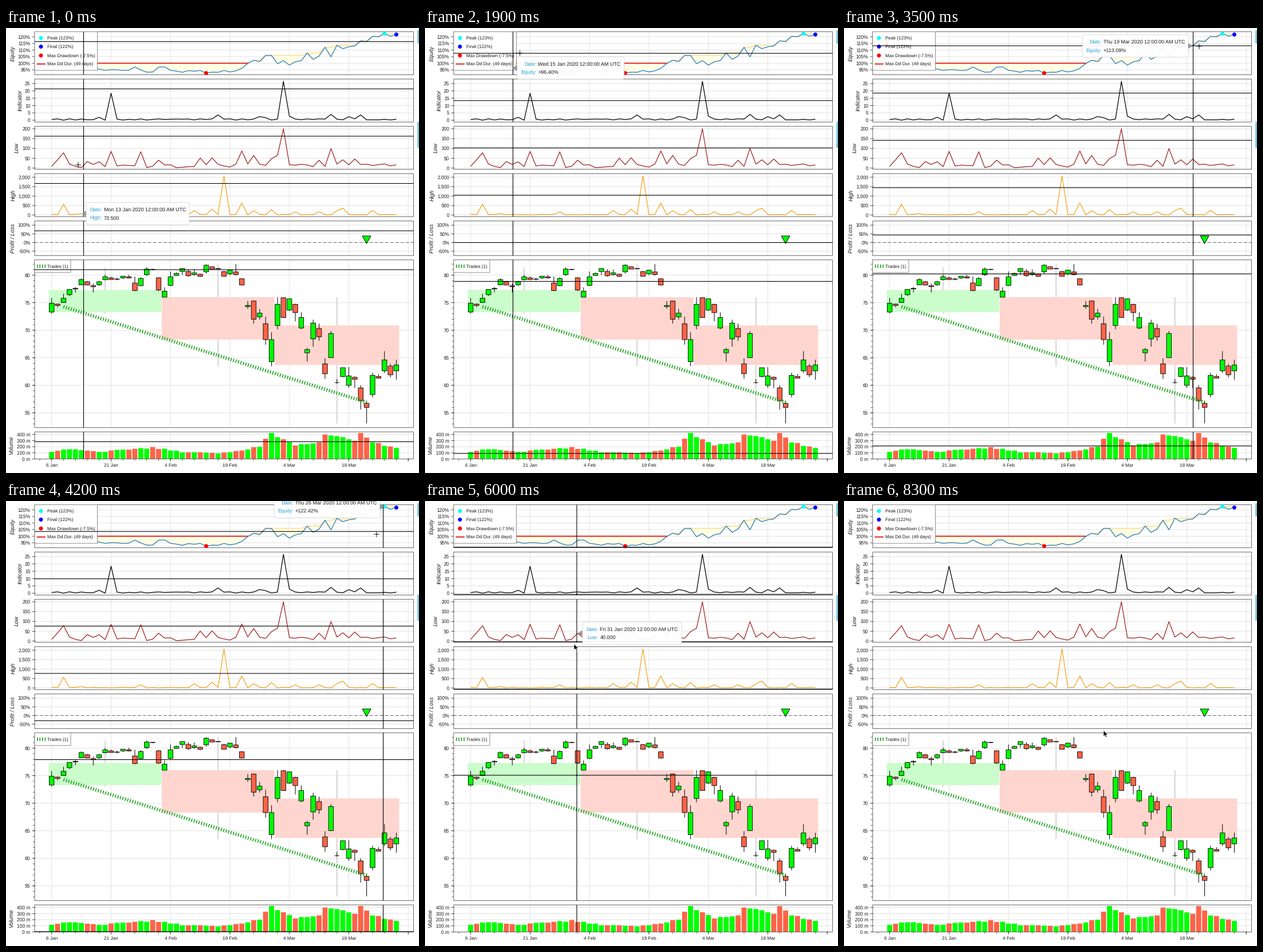
A matplotlib script that plays this animation: 721 by 777 pixels, repeating every 8.4 s.

```python
import numpy as np
import matplotlib
import matplotlib.pyplot as plt
from matplotlib.animation import FuncAnimation
from matplotlib.collections import LineCollection, PatchCollection
from matplotlib.patches import Circle, FancyBboxPatch, Polygon, Rectangle

matplotlib.rcParams.update({"font.family": "Liberation Sans", "text.hinting": "none",
                            "path.snap": False})

W, H = 721, 777
FRAMES, STEP = 84, 100
LEFT, RIGHT = 50, 711.5
X0, DX, N = 79.7, 10.375, 59
LIME, TOMATO, GREEN, INK = "#00ff00", "#ff6347", "#0a9e0a", "#1a1a1a"
LAG = 0.04  # the crosshair trails the pointer, in seconds

# name, top, bottom, label x, y of zero, pixels per unit, ticks, tick format
PANELS = [
    ("Equity", 6.5, 81.6, 12, 291.5, 2.3, range(95, 121, 5), "{:.0f}%"),
    ("Indicator", 89.1, 164.2, 25, 161, 2.56, range(0, 26, 5), "{:.0f}"),
    ("Low", 171.7, 246.8, 19, 244.5, 0.3425, range(0, 201, 50), "{:.0f}"),
    ("High", 254.3, 329.4, 13, 326.5, 0.033, range(0, 2001, 500), "{:,.0f}"),
    ("Profit / Loss", 336.9, 397.4, 12, 374.5, 0.303, range(-50, 101, 50), "{:.0f}%"),
    ("", 404.8, 697.7, 0, 1201.1, 9.62, range(55, 81, 5), "{:.0f}"),
    ("Volume", 705.2, 752.5, 9, 752.5, 0.107, range(0, 401, 100), "{:.0f} m"),
]

rng = np.random.default_rng(4)
idx = np.arange(N)
xs = X0 + DX * idx
days = np.busday_offset("2020-01-06", idx, roll="forward",
                        holidays=["2020-01-20", "2020-02-17"])

# Closing prices drive the candles, the equity curve and the monthly blocks.
close = np.array([
    74.9, 74.5, 75.8, 77.4, 77.6, 79.2, 78.2, 77.9, 78.8, 79.7, 79.2, 79.3, 79.8, 79.5,
    77.2, 79.4, 81.1, 81, 77.3, 77.1, 79.7, 80.3, 81.2, 79.9, 80.4, 79.8, 81.8, 81.1,
    81.2, 79.8, 80.9, 80.1, 78.2, 74.5, 72, 73.1, 68.3, 68.3, 74.7, 72.3, 75.7, 73.2,
    72.3, 66.5, 71.3, 68.8, 62.1, 69.4, 60.5, 63.2, 61.7, 61.1, 57.2, 56, 61.8, 61.3,
    64.6, 61.9, 63.7])
GAPS = {0: 73.3, 19: 76, 33: 74.3, 34: 75.3, 37: 64.3, 39: 75.9, 42: 70.4, 43: 65.9,
        46: 63.9, 48: 60.5, 50: 60}
previous = np.r_[close[0], close[:-1]]
opening = previous + 0.4 * (close - previous)
opening[list(GAPS)] = list(GAPS.values())
reach = np.where(idx < 32, 0.25, 0.7)
high = np.maximum(opening, close) + np.minimum(rng.exponential(reach), 1.6)
low = np.minimum(opening, close) - np.minimum(rng.exponential(reach), 1.6)
high = np.minimum(high, np.where(idx < 33, 82, 76))
low[53] = 53.1
colors = [LIME if up else TOMATO for up in close >= opening]

volume = np.interp(idx, [0, 3, 8, 17, 22, 28, 32, 35, 37, 41, 45, 46, 50, 51, 52, 54, 58],
                   [120, 165, 118, 190, 115, 95, 135, 215, 420, 220, 280, 415, 320, 290,
                    405, 290, 172]) * rng.uniform(0.92, 1.05, N)

# A short from bar 2, turned into a long at bar 53.
ENTRY, EXIT, BUY, SELL = 74.273, 56.9, 53, 2
equity = 100 + 0.99368 * (ENTRY - close)
equity[:SELL] = 100
equity[BUY:] = 116.4 + 0.7 * (close[BUY:] - close[BUY])


def spiky(lo, hi, peaks):
    v = np.round(2 * rng.uniform(lo, hi, N)) / 2 if hi > 2 else rng.uniform(lo, hi, N)
    v[list(peaks)] = list(peaks.values())
    return v


SERIES = {
    "Equity": equity,
    "Indicator": spiky(0, 1, {8: 2, 10: 18.4, 28: 3.6, 35: 2.5, 36: 1.7, 39: 26.5,
                              40: 2.8, 47: 4, 50: 2.4, 52: 3.6}),
    "Low": spiky(2, 22, {1: 42, 2: 78, 6: 33, 8: 32, 10: 85, 15: 83, 18: 40, 25: 51,
                         27: 52, 28: 18.5, 32: 87, 34: 64, 37: 48, 38: 65, 39: 200,
                         45: 40, 47: 99, 49: 42, 51: 46}),
    "High": spiky(3, 40, {2: 570, 5: 73.5, 8: 15.5, 15: 170, 24: 230, 27: 310, 29: 2070,
                          32: 640, 34: 230, 37: 290, 41: 165, 45: 170, 48: 230, 49: 365,
                          54: 245}),
}
COLORS = {"Equity": "#1f77b4", "Indicator": "black", "Low": "#a02020", "High": "#f5a21b"}

# pointer path: seconds, x, y
PATH = np.array([
    (-0.04, 135.5, 271.5), (0, 126, 239), (0.9, 134, 68), (1.2, 80, 52), (1.4, 14, 48),
    (2.66, 396.2, 37.5), (2.7, 406, 38), (3.46, 609.5, 31), (3.5, 620, 32),
    (3.8, 668, 34), (4.1, 676, 46), (5.16, 367, 173.8), (5.2, 359, 174.2),
    (6.76, 166, 321), (6.8, 163, 321), (7.4, 230, 316), (7.8, 362, 314),
    (8.16, 453, 400.5)])

fig = plt.figure(figsize=(W / 72, H / 72), dpi=72, facecolor="white")
ax = fig.add_axes([0, 0, 1, 1])
ax.set(xlim=(0, W), ylim=(H, 0))
ax.axis("off")


def line(px, py, color, lw=1, z=3, **kw):
    kw.setdefault("solid_capstyle", "butt")
    return ax.plot(px, py, color=color, lw=lw, zorder=z, **kw)[0]


def label(x, y, s, size, ha="left", color=INK, z=6):
    return ax.text(x, y + 0.36 * size, s, size=size, ha=ha, va="baseline",
                   color=color, zorder=z)


def box(x0, y0, x1, y1, face, edge="none", z=2, **kw):
    ax.add_patch(Rectangle((x0, y0), x1 - x0, y1 - y0, fc=face, ec=edge, lw=1,
                           zorder=z, **kw))


def dot(x, y, color, z=5):
    ax.add_patch(Circle((x, y), 3.5, fc=color, ec="none", zorder=z))


def segments(segs, color, lw, z):
    ax.add_collection(LineCollection(segs, colors=color, linewidths=lw, zorder=z))


def bars(half, top, bottom, edge, z):
    rects = [Rectangle((x - half, a), 2 * half, b - a) for x, a, b in zip(xs, top, bottom)]
    ax.add_collection(PatchCollection(rects, facecolors=colors, edgecolors=edge,
                                      linewidths=0.9, zorder=z))


def hatched(px, py, z):
    line(px, py, GREEN, 6, z, linestyle=(0, (0.25, 0.5)), dash_capstyle="butt")


def to_y(panel, v):
    return panel[4] - panel[5] * v


def draw_panels():
    ticks_x = X0 + DX * np.arange(0, 61, 10)
    grid, marks = [], []
    for panel in PANELS:
        name, top, bottom, lx, *_, ticks, fmt = panel
        grid += [[(x, top), (x, bottom)] for x in ticks_x]
        for v in ticks:
            y = to_y(panel, v)
            grid.append([(LEFT, y), (RIGHT, y)])
            marks.append([(45.5, y), (51.5, y)])
            label(42.5, y, fmt.format(v), 8.5, "right")
        ax.text(lx, (top + bottom) / 2, name, size=9.75, style="italic", rotation=90,
                ha="center", va="center", color=INK)
        box(LEFT, top, RIGHT, bottom, "none", "#666666", 5)
    minor = [to_y(PANELS[5], v) for v in range(53, 83)]
    marks += [[(47, y), (50, y)] for y in minor]
    marks += [[(x, 751), (x, 757)] for x in ticks_x]
    marks += [[(x, 752.5), (x, 755.5)] for x in X0 + 2 * DX * np.arange(-1, 31)]
    segments(grid, "#e3e3e3", 1, 1)
    segments(marks, "#333333", 0.8, 5)
    for x, s in zip(ticks_x, ["6 Jan", "21 Jan", "4 Feb", "19 Feb", "4 Mar", "18 Mar"]):
        label(x, 763, s, 8.3, "center")


def draw_series():
    for panel in PANELS[:4]:
        line(xs, to_y(panel, SERIES[panel[0]]), COLORS[panel[0]], 1.25, 4,
             solid_joinstyle="round")
    y = to_y(PANELS[0], equity)
    best = np.minimum.accumulate(y)
    ax.fill_between(xs, y, best, fc="#ffffe4", ec="none", zorder=2)
    line(xs, best, "#ffcb66", 1, 3)
    line([X0, xs[33]], [61.5, 61.5], "#e01010", 1.8, 4)
    for i, c in [(equity.argmin(), "red"), (equity.argmax(), "cyan"), (N - 1, "blue")]:
        dot(xs[i], y[i], c)


def draw_price():
    price = PANELS[5]
    for a, b in [(0, 18), (19, 37), (38, 58)]:
        mid = (xs[a] + xs[b]) / 2
        wick = [to_y(price, low[a:b + 1].min()), to_y(price, high[a:b + 1].max())]
        line([mid, mid], wick, "#bdbdbd", 1.2, 2)
        box(xs[a] - 4.9, to_y(price, opening[a]), xs[b] + 4.9, to_y(price, close[b]),
            "#cbfccb" if close[b] > opening[a] else "#ffd5cf")
    segments([[(x, to_y(price, a)), (x, to_y(price, b))] for x, a, b in zip(xs, low, high)],
             "black", 1, 3)
    bars(4.2, to_y(price, np.maximum(opening, close)),
         to_y(price, np.minimum(opening, close)), "black", 4)
    bars(4.4, to_y(PANELS[6], volume), np.full(N, PANELS[6][4]), "none", 3)
    hatched([xs[SELL], xs[BUY]], [to_y(price, ENTRY), to_y(price, EXIT)], 4.5)


def draw_profit():
    line([LEFT, RIGHT], [374.5, 374.5], "#555555", 0.9, 3, linestyle=(0, (6, 4)))
    ax.add_patch(Polygon([(622, 363), (637, 363), (629.5, 376.5)], fc=LIME, ec="black",
                         lw=0.9, zorder=4))


def draw_legends():
    box(LEFT, 6.5, 159.5, 74, "white", "#8a8a8a", 5.5, alpha=0.97)
    for y, c, s in [(17.5, "cyan", "Peak (123%)"), (32.5, "blue", "Final (122%)"),
                    (48, "red", "Max Drawdown (-7.5%)")]:
        dot(61, y, c, 6)
        label(72, y, s, 8)
    line([53.5, 69], [62.8, 62.8], "#e01010", 1.8, 6)
    label(72, 62.8, "Max Dd Dur. (49 days)", 8)
    box(LEFT, 404.8, 113, 427, "white", "#8a8a8a", 5.5, alpha=0.97)
    hatched([54, 70], [416, 416], 6)
    label(72, 416, "Trades (1)", 8)


draw_panels()
draw_series()
draw_price()
draw_profit()
draw_legends()
for y0, y1 in [(4, 27), (164, 209)]:
    box(718.5, y0, 720.5, y1, "#45b5d3")

hair = line([], [], "black", 1.1, 7)
tip = ax.add_patch(FancyBboxPatch((0, 0), 1, 1, boxstyle="round,pad=0,rounding_size=2.5",
                                  fc="white", ec="#d5d5d5", lw=0.9, alpha=0.95, zorder=8))
notch = ax.add_patch(Polygon([(0, 0)] * 3, fc="#909599", ec="none", zorder=8))
keys = [label(0, 0, "", 9, "right", "#2a9fd0", 9) for _ in range(2)]
vals = [label(0, 0, "", 9, "left", INK, 9) for _ in range(2)]
TIP = [tip, notch, *keys, *vals]

PLUS = np.array([(-5, 0), (5, 0), (np.nan, 0), (0, -5), (0, 5)])
ARROW = np.array([(0, 0), (0, 10.5), (2.4, 8.4), (4, 12), (5.8, 11.2), (4.3, 7.7), (7.4, 7.4)])
HAND = np.array([(-1, 0), (0.8, 0), (1.2, 4), (5, 4.8), (6.6, 6), (6.2, 9), (5, 11.2),
                 (0, 11.2), (-3.8, 6.6), (-3, 5.6), (-1.2, 7)])
plus = line([], [], "#222222", 1, 10)
arrow = ax.add_patch(Polygon(ARROW, fc="black", ec="white", lw=0.7, zorder=10))
hand = ax.add_patch(Polygon(HAND, fc="white", ec="black", lw=0.9, zorder=10))


def pointer(t):
    return [np.interp(t, PATH[:, 0], PATH[:, c]) for c in (1, 2)]


def panel_at(x, y):
    if LEFT <= x <= RIGHT:
        for p in PANELS:
            if p[1] <= y <= p[2]:
                return p
    return None


def width(text):
    return text.get_window_extent().width


def show_tip(panel, x):
    name = panel[0]
    i = int(np.clip(round((x - X0) / DX), 0, N - 1))
    v = SERIES[name][i]
    px, py = xs[i], to_y(panel, v)
    keys[0].set_text("Date:")
    keys[1].set_text(name + ":")
    vals[0].set_text(days[i].item().strftime("%a %d %b %Y") + " 12:00:00 AM UTC")
    vals[1].set_text(f"{v - 100 if v < 0 else v:+.2f}%" if name == "Equity" else f"{v:.3f}")
    key_w = max(map(width, keys))
    w = key_w + max(map(width, vals)) + 15
    side = 1 if px < W / 2 else -1
    x0 = px + 8.5 if side > 0 else px - 7.5 - w
    tip.set_bounds(x0, py - 19.5, w, 39)
    notch.set_xy([(px + side, py), (px + 8 * side, py - 5), (px + 8 * side, py + 5)])
    for row in range(2):
        y = py - 4.1 + 14.6 * row
        keys[row].set_position((x0 + 6 + key_w, y))
        vals[row].set_position((x0 + 9 + key_w, y))


def update(k):
    t = k * STEP / 1000
    (hx, hy), (cx, cy) = pointer(t - LAG), pointer(t)
    in_legend = LEFT <= cx <= 159.5 and 6.5 <= cy <= 74
    panel = None if in_legend else panel_at(hx, hy)

    pts = []
    if panel:
        off = hy - panel[1]
        for _, top, bottom, *_ in PANELS:
            pts += [(hx, top), (hx, bottom), (np.nan, 0)]
            if top + off <= bottom:
                pts += [(LEFT, top + off), (RIGHT, top + off), (np.nan, 0)]
    hair.set_data(*np.array(pts).T if pts else ([], []))

    tipped = bool(panel) and panel[0] in SERIES
    for a in TIP:
        a.set_visible(tipped)
    if tipped:  # text must be visible to be measured
        show_tip(panel, hx)

    crossed = not in_legend and panel_at(cx, cy) is not None
    hand.set_visible(in_legend)
    plus.set_visible(crossed)
    arrow.set_visible(not in_legend and not crossed)
    plus.set_data(*(PLUS + (cx, cy)).T)
    arrow.set_xy(ARROW + (cx, cy))
    hand.set_xy(HAND + (cx, cy))
    return [hair, *TIP, plus, arrow, hand]


anim = FuncAnimation(fig, update, frames=FRAMES, interval=STEP, repeat=True,
                     repeat_delay=0, blit=False)
plt.show()
```
